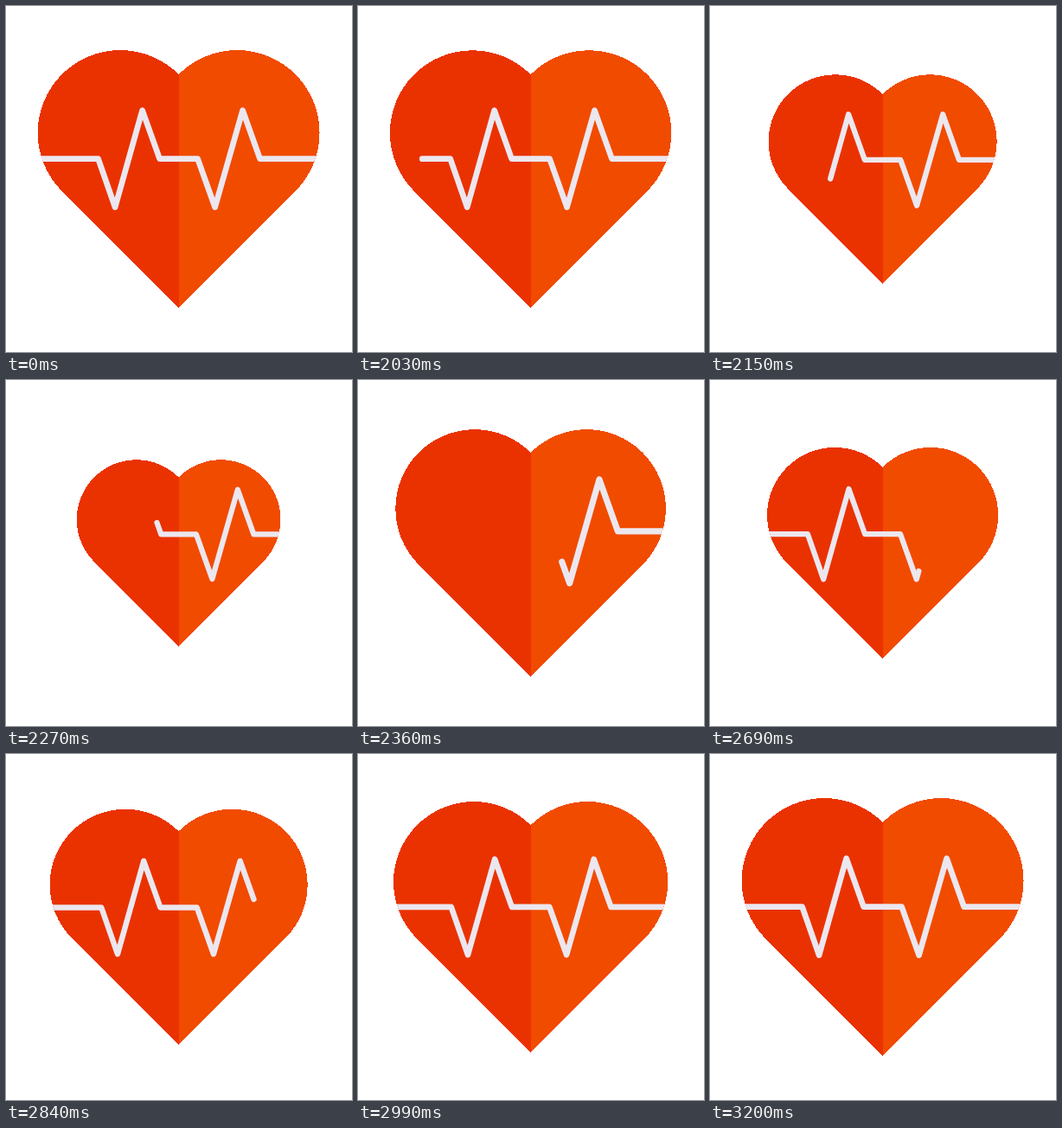
Animation of 400x400 px, one loop 3.23 s. Source, as an HTML page:

```html
<!DOCTYPE html>
<html lang="en">
<head>
<meta charset="utf-8">
<title>Heartbeat</title>
<style>
  html, body { margin: 0; width: 100%; height: 100%; overflow: hidden; background: #fff; }
  svg { display: block; width: 100vw; height: 100vh; }
  .pulse { fill: none; stroke: #ece7ef; stroke-width: 6.7; stroke-linecap: round; stroke-linejoin: round; }
</style>
</head>
<body>
<svg viewBox="0 0 400 400">
  <defs>
    <!-- Radii a touch short of half the chord grow into exact semicircles. -->
    <path id="left" d="M200 349L65 214A95.4 95.4 0 0 1 200 79Z"/>
    <path id="right" d="M200 349L335 214A95.4 95.4 0 0 0 200 79Z"/>
    <clipPath id="inside">
      <path id="mask" d="M200 349L65 214A95.4 95.4 0 0 1 200 79A95.4 95.4 0 0 1 335 214Z"/>
    </clipPath>
    <clipPath id="strip"><rect y="166" width="400" height="9"/></clipPath>
  </defs>
  <g id="heart" shape-rendering="crispEdges">
    <use href="#left" fill="#ea3200"/>
    <use href="#right" fill="#f14b00"/>
  </g>
  <g clip-path="url(#inside)">
    <g id="tail"><path id="leaving" class="pulse"/></g>
    <path id="entering" class="pulse"/>
  </g>
</svg>
<script>
const LOOP = 3230, REST = 2030, STEP = 30;
const $ = id => document.getElementById(id);
const heart = $('heart'), mask = $('mask'), tail = $('tail');
const leaving = $('leaving'), entering = $('entering');

const smooth = t => t * t * (3 - 2 * t);
const settle = t => 1 - (1 - t) ** 2.15;

// [step, scale, easing into this key]
const heartKeys = [[0.7, 1], [8, 0.7, smooth], [15.15, 1.14, smooth], [21, 0.771, smooth], [40, 1, settle]];
const lineKeys = [[0.5, 1], [8, 0.908, smooth], [15.2, 1.19, smooth], [23.8, 0.925, smooth], [40, 1, settle]];

const line = 'M35 177H107L126.5 233L158 121L178 177H222L242 233L274 121L294 177H365';
leaving.setAttribute('d', line);
entering.setAttribute('d', line);
const length = leaving.getTotalLength();
leaving.style.strokeDasharray = `${length} ${length}`;

function valueAt(keys, step) {
  if (step <= keys[0][0]) return keys[0][1];
  for (let k = 1; k < keys.length; k++) {
    const [from, a] = keys[k - 1], [to, b, ease] = keys[k];
    if (step <= to) return a + (b - a) * ease((step - from) / (to - from));
  }
  return keys[keys.length - 1][1];
}

function scale(el, s, cy) {
  el.setAttribute('transform', `translate(199.6 ${cy}) scale(${s}) translate(-200 -200)`);
}

function show(el, visible) {
  el.style.display = visible ? '' : 'none';
}

function draw(ms) {
  const step = ms < REST ? 0 : Math.floor((ms - REST) / STEP) + 1;
  const size = valueAt(heartKeys, step);
  const swing = valueAt(lineKeys, step);
  scale(heart, size, 200);
  scale(mask, size, 200);
  scale(leaving, swing, 199.6);
  scale(entering, swing, 199.6);

  const start = step ? 39.5 + 31.5 * (step - 1) : 0;
  show(leaving, start < length);
  leaving.style.strokeDashoffset = -start;
  tail.setAttribute('clip-path', step >= 18 ? 'url(#strip)' : 'none');

  const end = 266 + 31 * (step - 18);
  show(entering, step >= 15);
  entering.style.strokeDasharray = end < length ? `${Math.max(end, 0)} ${length * 2}` : 'none';
}

const origin = performance.now();
function tick() {
  draw((performance.now() - origin) % LOOP);
  requestAnimationFrame(tick);
}
tick();
</script>
</body>
</html>
```
